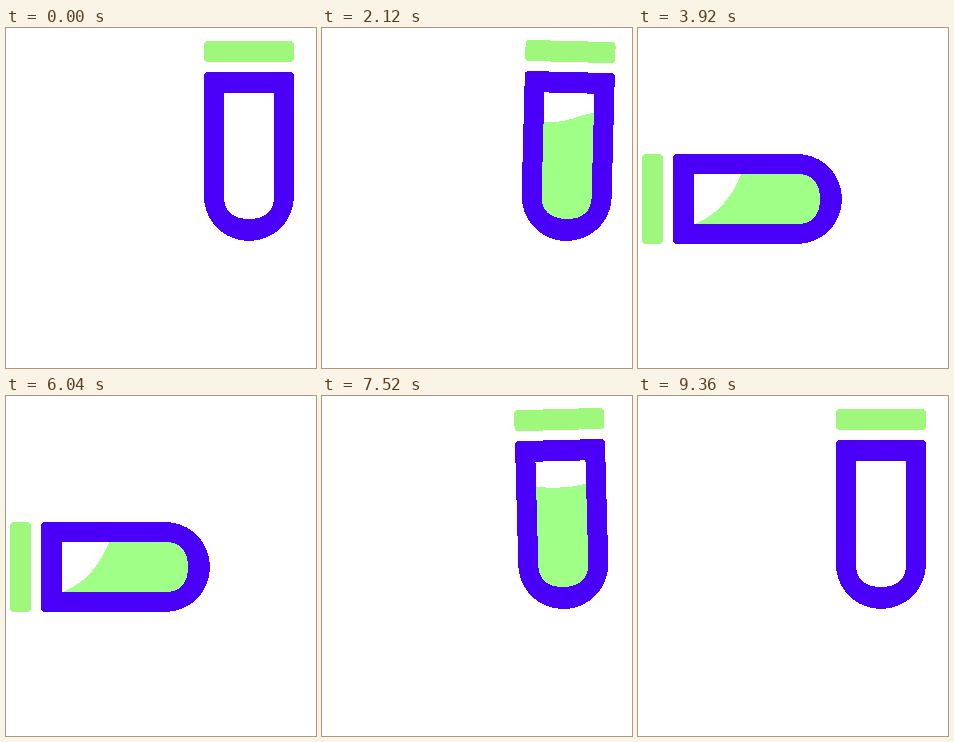
An HTML page that plays this animation: 310x340 px, repeating every 9400 ms.

```html
<!DOCTYPE html>
<html lang="en">
<head>
<meta charset="utf-8">
<title>Test tube</title>
<style>
  html, body { margin: 0; width: 100%; height: 100%; overflow: hidden; background: #fff; }
  svg { display: block; width: 100%; height: 100%; }
</style>
</head>
<body>
<svg viewBox="0 0 310 340" shape-rendering="crispEdges">
  <g id="tube">
    <rect x="-45" y="-155" width="90" height="21" rx="4" fill="#9ff87c"/>
    <path id="liquid" fill="#a0ff86"/>
    <path fill="#4a00f8" fill-rule="evenodd" d="M-45-120q0-4 4-4h82q4 0 4 4V0a45 45 0 0 1-90 0z
      M-25-103V1c0 14 9 22 25 22s25-8 25-22V-103z"/>
  </g>
</svg>
<script>
const LOOP = 9400, MIRROR = 9920, STEP = 40;
const tube = document.getElementById("tube");
const liquid = document.getElementById("liquid");

// Ease in and out from 0 to 1 between two times; a higher power is steeper
function ease(t, from, to, power = 2) {
  const u = Math.min(1, Math.max(0, (t - from) / (to - from)));
  return u < 0.5 ? (2 * u) ** power / 2 : 1 - (2 - 2 * u) ** power / 2;
}

// The tube rocks right, left, right, then rolls over to the left
function drawTube(t) {
  const rock = 1.5 * ease(t, 2000, 2120) - 8 * ease(t, 2120, 2250) + 12.5 * ease(t, 2240, 2600);
  const tip = ease(t, 2597, 3477, 2.8);
  const roll = ease(t, 2597, 3311, 2.8);
  const x = 243 + 1.1 * rock - 90.6 * roll;
  const y = 168 + 3 * tip ** 2;
  tube.setAttribute("transform", `translate(${x} ${y}) rotate(${rock - 96 * tip})`);
}

// The liquid rises, sloshes from side to side and settles in the lying tube
function drawLiquid(t) {
  const fill = ease(t, 560, 1040);
  const settle = ease(t, 3040, 3920);
  const slosh = 8.3 * Math.cos((t - 2965) / 740 * 2 * Math.PI) * fill;
  const tilt = slosh * (1 - settle) - 23.5 * settle;
  const level = 32 - 111 * fill;
  const left = level + tilt, right = level - tilt;
  const shift = 9 * settle;
  const curve = `C${-8 - shift} ${left + 3 + 18 * settle} ${8 - shift} ${right + 4 - 15 * settle} 25 ${right}`;
  liquid.setAttribute("d", `M-30 ${left}H-25${curve}H30V30H-30z`);
}

const start = performance.now();
function tick() {
  const now = (performance.now() - start) % LOOP;
  const step = Math.floor(now / STEP) * STEP;
  const t = Math.min(step, MIRROR - step); // second half runs backwards
  drawTube(t);
  drawLiquid(t);
  requestAnimationFrame(tick);
}
tick();
</script>
</body>
</html>
```
